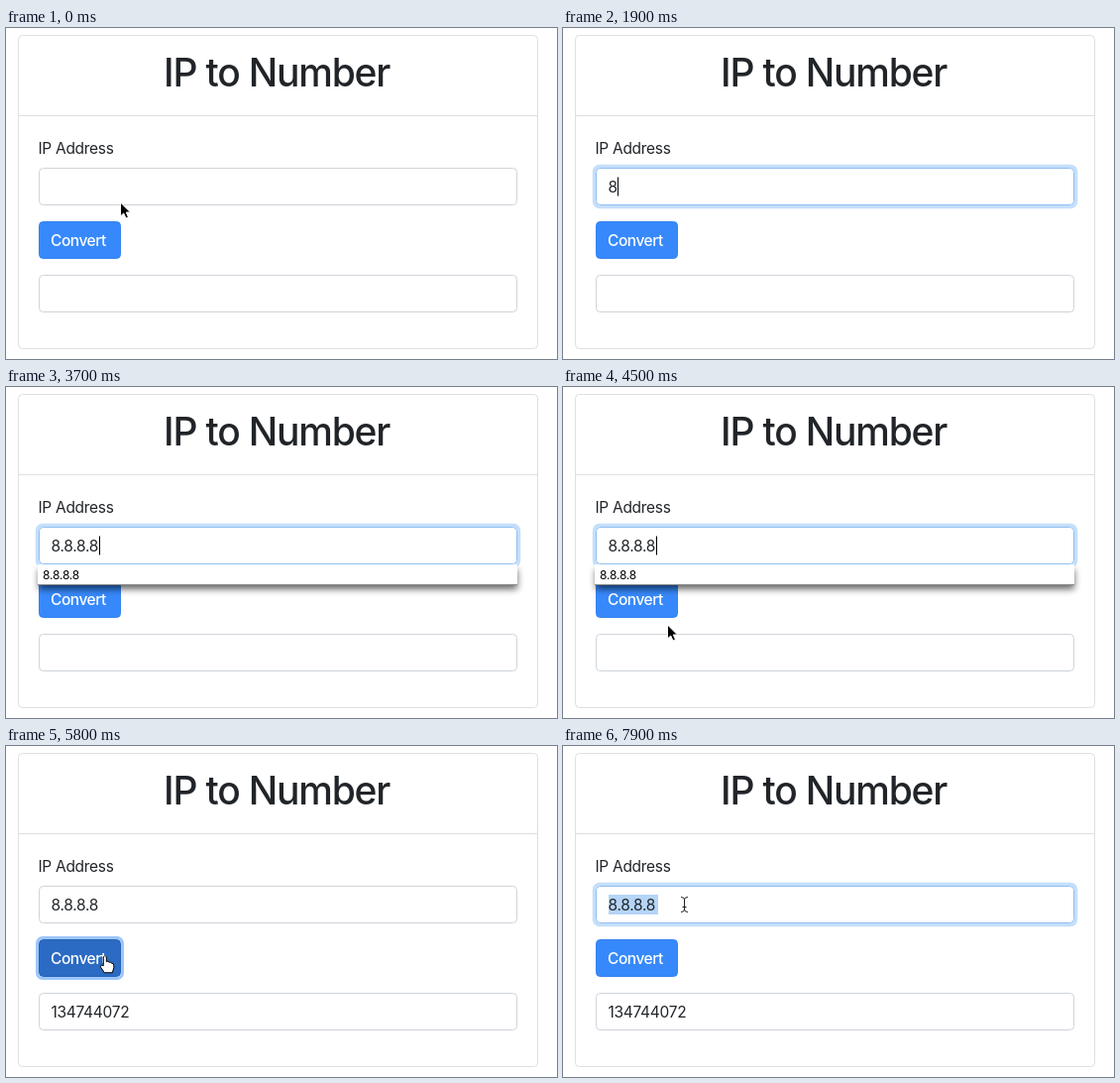
Write an HTML page that moves like this. It is 556 by 334 pixels and loops after 8000 ms.

```html
<!DOCTYPE html>
<html lang="en">
<head>
<meta charset="utf-8">
<title>IP to Number</title>
<style>
  html, body { margin: 0; width: 100%; height: 100%; overflow: hidden; background: #fff; }
  svg { display: block; }
  text { font: 15.5px Inter, "Liberation Sans", sans-serif; letter-spacing: -.3px; fill: #212529; white-space: pre; }
  #title { font-size: 39px; font-weight: 500; letter-spacing: -1.2px; }
  #btnText { fill: #fff; font-weight: 500; letter-spacing: -.45px; }
  #popup text { font-size: 12px; letter-spacing: -.2px; fill: #000; }
  .line { fill: none; stroke: #dfdfdf; }
  .field { fill: #fff; stroke: #ced4da; }
</style>
</head>
<body>
<svg width="556" height="334" viewBox="0 0 556 334">
  <defs>
    <filter id="blur" x="-10%" y="-100%" width="120%" height="300%"><feGaussianBlur stdDeviation="3.5"/></filter>
    <clipPath id="below"><path d="M20 179H540V230H20Z"/></clipPath>
  </defs>
  <rect class="line" x="12.5" y="7.5" width="524" height="316" rx="4"/>
  <path class="line" d="M13 88.5H536"/>
  <text id="title" x="159" y="59">IP to Number</text>
  <text x="32.5" y="127">IP Address</text>

  <rect id="ring" x="31.5" y="139.5" width="486" height="41" rx="5.5" fill="none" stroke="#c4dffb" stroke-width="3.5"/>
  <rect id="input" class="field" x="33.5" y="141.5" width="482" height="37" rx="4"/>
  <rect id="selection" x="46" y="150" width="50" height="20" fill="#b5d5f8"/>
  <text id="value" x="45.5" y="166"></text>
  <path id="caret" d="M.5 150.500V169.500" stroke="#000"/>

  <rect id="btnRing" x="31.500" y="193.500" width="86" height="41" rx="5.500" fill="none" stroke="#9cc6fb" stroke-width="3"/>
  <rect id="btn" x="33.500" y="195.500" width="82" height="37" rx="4"/>
  <text id="btnText" x="45" y="220">Convert</text>
  <rect class="field" x="33.500" y="249.500" width="482" height="37" rx="4"/>
  <text id="result" x="45.500" y="274">134744072</text>

  <g id="popup">
    <rect x="33" y="184" width="483" height="20" opacity=".6" filter="url(#blur)" clip-path="url(#below)"/>
    <rect x="32" y="179" width="484" height="20.500" fill="#fff"/>
    <path d="M32 199.500H516" stroke="#888"/>
    <text x="37" y="194">8.8.8.8</text>
  </g>

  <g id="cursor">
    <path id="arrow" d="M0 0V14L3.200 11L5.500 16L8 15L5.800 10H10Z" fill="#000" stroke="#fff"/>
    <g id="beam" fill="none">
      <path d="M-3.500-7.500Q0-7.500 0-5V5Q0 7.500-3.500 7.500M3.500-7.500Q0-7.500 0-5V5Q0 7.500 3.500 7.500M-2 2.500H2" stroke="#fff" stroke-width="2.500"/>
      <path d="M-3.500-7.500Q0-7.500 0-5V5Q0 7.500-3.500 7.500M3.500-7.500Q0-7.500 0-5V5Q0 7.500 3.500 7.500M-2 2.500H2" stroke="#222"/>
    </g>
    <path id="hand" d="M-1.500 8V0Q0-2.500 1.500 0V5Q3 3.500 4.300 5.500Q5.800 4.500 6.700 6.500Q9 6 9 8.500V11L7.500 16H-.5L-4.500 10Q-4 7-1.500 9Z" fill="#fff" stroke="#000" stroke-linejoin="round"/>
  </g>
</svg>
<script>
const LOOP = 8000;
const el = Object.fromEntries([...document.querySelectorAll("[id]")].map(e => [e.id, e]));
const show = (e, on) => e.style.display = on ? "" : "none";
const clamp = v => Math.max(0, Math.min(1, v));
const mix = (a, b, k) => a + (b - a) * k;
const within = (t, a, b) => t >= a && t < b;

// Pointer stops: time, x, y
const stops = [
  [0, 115.5, 176], [400, 104, 158], [500, 104, 158], [700, 98.5, 153],
  [3900, 98.5, 153], [4400, 105.5, 240], [4500, 105.5, 240], [4900, 98, 217],
  [5700, 98, 217], [6300, 122.5, 160], [LOOP, 122.5, 160]
];
const keys = [1900, 2300, 3000, 3100, 3300, 3400, 3500];

function pointer(t) {
  const i = stops.findIndex(s => s[0] > t);
  const [a, b] = [stops[i - 1], stops[i]];
  const k = clamp((t - a[0]) / (b[0] - a[0]));
  const ease = k * k * (3 - 2 * k);
  return [mix(a[1], b[1], ease), mix(a[2], b[2], ease)];
}

function caretOn(t) {
  if (!within(t, 1100, 5200)) return within(t, 6500, 6700);
  const last = [1150, ...keys].filter(k => k <= t).pop() ?? t;
  return (t - last) % 1000 < 500;
}

function draw(time) {
  const t = Math.floor(time % LOOP / 100) * 100; // ten pictures a second
  const popup = within(t, 2000, 4900);
  const [x, y] = pointer(t);
  const overBtn = !popup && within(y, 195, 233) && x < 116;
  const overInput = within(y, 141, 175);

  const focus = t < 5200 ? clamp((t - 1100) / 150) : Math.max(clamp((5350 - t) / 150), clamp((t - 6500) / 150));
  el.ring.style.opacity = focus;
  el.input.style.stroke = `rgb(${mix(206, 144, focus)},${mix(212, 190, focus)},${mix(218, 240, focus)})`;

  el.value.textContent = "8.8.8.8".slice(0, keys.filter(k => k <= t).length);
  const width = el.value.textContent ? el.value.getComputedTextLength() : 0;
  el.caret.setAttribute("transform", `translate(${Math.round(46 + width)})`);
  show(el.caret, caretOn(t));
  show(el.selection, t >= 6700);

  show(el.btnRing, within(t, 5200, 6500));
  el.btn.style.fill = overBtn ? "#2b6bc3" : "#3789fb";
  el.btn.style.stroke = overBtn ? "#2763b6" : "#3482f0";
  show(el.result, t >= 5300);
  show(el.popup, popup);

  show(el.cursor, !within(t, 1900, 4000));
  el.cursor.setAttribute("transform", `translate(${x} ${y})`);
  show(el.beam, overInput);
  show(el.hand, overBtn);
  show(el.arrow, !overInput && !overBtn);
}

const start = performance.now();
(function tick() {
  draw(performance.now() - start);
  requestAnimationFrame(tick);
})();
</script>
</body>
</html>
```
